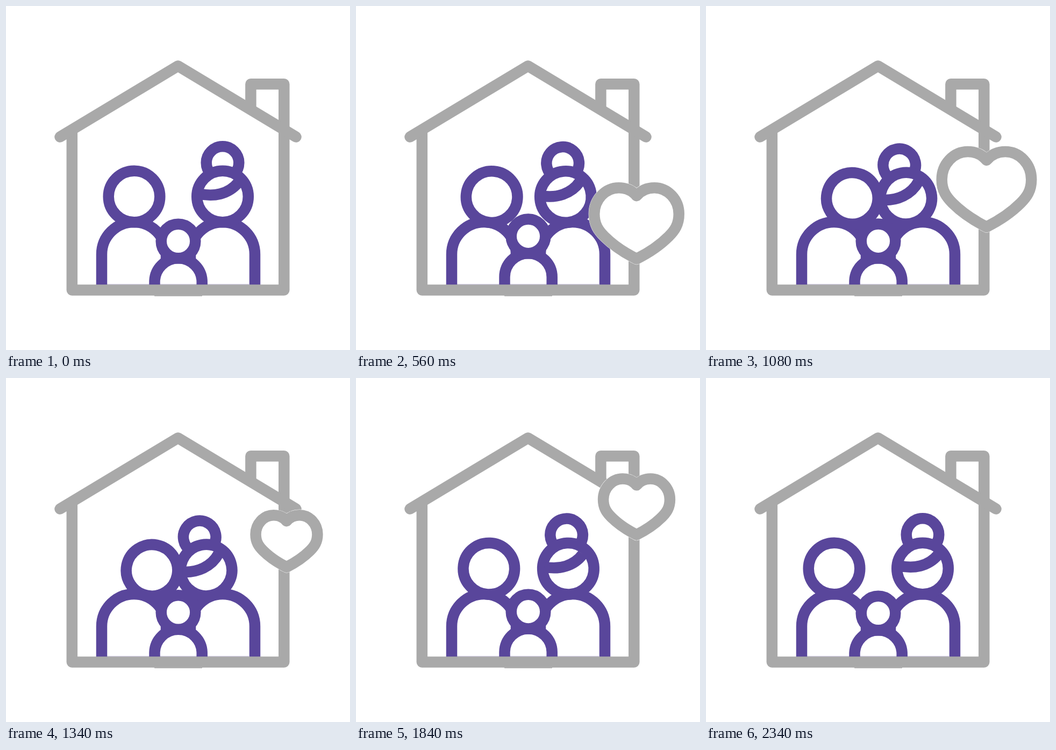
These frames come from a looping animation (640 by 640 pixels, 2.4 s). An HTML page:

```html
<!DOCTYPE html>
<html lang="en">
<head>
<meta charset="utf-8">
<title>Family at home</title>
<style>
  html, body { margin: 0; width: 100%; height: 100%; overflow: hidden; background: #fff; }
  svg { display: block; width: 100%; height: 100%; }
  .people { fill: #fff; stroke: #59469b; stroke-width: 20.5; }
  .house { fill: none; stroke: #a9a9a9; stroke-width: 20.5; stroke-linecap: round; stroke-linejoin: round; }
  #heart { stroke-linejoin: round; }
</style>
</head>
<body>
<svg viewBox="0 0 640 640">
  <g class="people">
    <path d="M178 526V462a60 60 0 0 1 120 0V526"/>
    <path d="M343 526V462a60 60 0 0 1 120 0V526"/>
    <circle id="man" cx="238.5" cy="354.5" r="47.8"/>
    <g id="woman">
      <circle cx="403" cy="291.6" r="30.3"/>
      <circle cx="403" cy="354.5" r="47.8"/>
      <path d="M359 349C386 356 414 350 431.5 329" fill="none"/>
    </g>
    <g id="child">
      <path d="M276.5 535V513.4a44.1 44.1 0 0 1 88.2 0V535"/>
      <circle cx="320.5" cy="437.5" r="31.8"/>
    </g>
  </g>
  <path d="M188 517.9H452" stroke="#59469b" stroke-width=".7" opacity=".6"/>
  <g class="house">
    <path d="M122.8 236V528.5H517.3V145.3H455.4V188"/>
    <path d="M100.5 243.5L320 111.5L539.5 243.5"/>
    <path d="M276 539.2H365" stroke-width="1.4" style="stroke-width:1.4;stroke-linecap:butt"/>
  </g>
  <g id="heart">
    <path id="halo" fill="#fff" stroke="#fff"/>
    <path id="rim" fill="none" stroke="#a9a9a9"/>
  </g>
</svg>
<script>
const LOOP = 2400, SPAN = 2340, MID = SPAN / 2, STROKE = 20.5;
const $ = id => document.getElementById(id);
const man = $('man'), woman = $('woman'), child = $('child');
const heart = $('heart'), halo = $('halo'), rim = $('rim');

// Heart of half-width 1, centred on the origin.
const HEART = 'M0 -.65C-.1 -.77 -.25 -.84 -.42 -.84C-.74 -.84 -1 -.56 -1 -.22' +
  'C-1 .03 -.9 .17 -.76 .31C-.52 .55 -.28 .7 0 .84' +
  'C.28 .7 .52 .55 .76 .31C.9 .17 1 .03 1 -.22' +
  'C1 -.56 .74 -.84 .42 -.84C.25 -.84 .1 -.77 0 -.65Z';
halo.setAttribute('d', HEART);
rim.setAttribute('d', HEART);

const clamp = u => Math.min(1, Math.max(0, u));

// cubic-bezier(.75, 0, .25, 1)
function ease(u) {
  if (u <= 0 || u >= 1) return clamp(u);
  let lo = 0, hi = 1, s = 0.5;
  for (let i = 0; i < 24; i++) {
    s = (lo + hi) / 2;
    const x = 2.25 * s * (1 - s) ** 2 + 0.75 * s * s * (1 - s) + s ** 3;
    if (x < u) lo = s; else hi = s;
  }
  return s * s * (3 - 2 * s);
}

function drawPeople(t) {
  const m = MID - Math.abs(Math.min(t, SPAN) - MID);
  const tilt = 11.5 * ease(m / MID);
  const hop = 12.7 * ease(1 - Math.abs(m - 735) / 400);
  man.setAttribute('transform', `rotate(${tilt} 238.5 522.5)`);
  woman.setAttribute('transform', `rotate(${-tilt} 403 509.5)`);
  child.setAttribute('transform', `translate(0 ${-hop})`);
}

function drawHeart(t) {
  const grow = 1 - (1 - clamp((t - 330) / 310)) ** 2;
  const fade = 1 - clamp((t - 1960) / 190) ** 4;
  const beat = 55.6 + 14.4 * (1 + Math.cos((t - 1655) / 540 * 2 * Math.PI));
  const size = beat * grow * fade;
  heart.style.display = size > 0.5 ? '' : 'none';
  if (size <= 0.5) return;
  const u = (t - 330) / 1830;
  const y = 426.4 - 218 * (u - 0.035 * Math.sin(2 * Math.PI * u));
  heart.setAttribute('transform', `translate(522 ${y}) scale(${size})`);
  rim.setAttribute('stroke-width', STROKE / size);
  halo.setAttribute('stroke-width', (STROKE + 0.8) / size);
}

const start = performance.now();
function tick() {
  const t = (performance.now() - start) % LOOP;
  drawPeople(t);
  drawHeart(t);
  requestAnimationFrame(tick);
}
tick();
</script>
</body>
</html>
```
